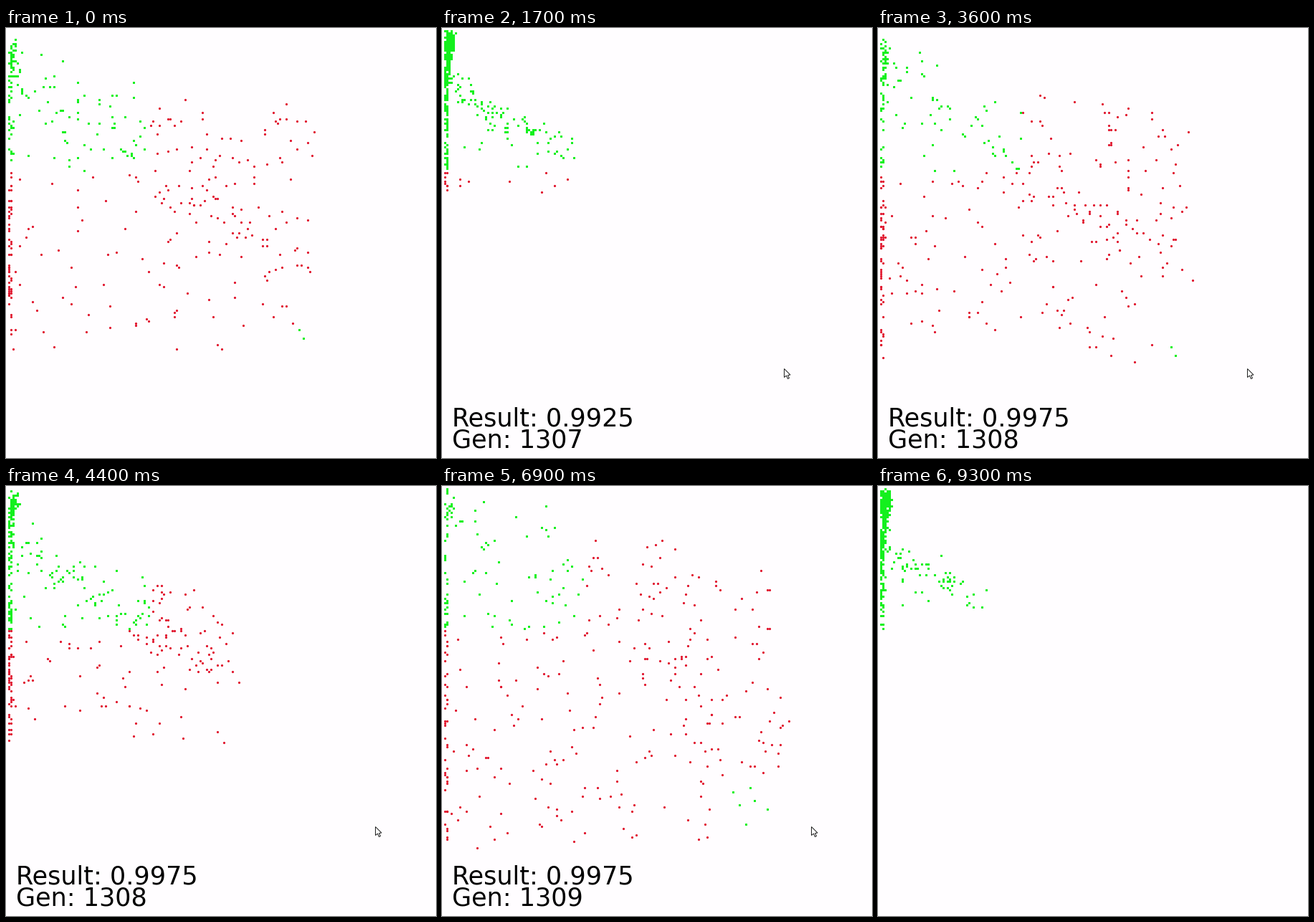
Recreate the animation shown at these times as a matplotlib script. Size 600 px wide and 600 px high, loop 9.4 s.

```python
import math

import matplotlib.pyplot as plt
import numpy as np
from matplotlib.animation import FuncAnimation
from matplotlib.patches import Polygon

SIZE, DPI = 600, 100
FRAMES, INTERVAL = 94, 100
CELL, LAST = 3, 199          # pixels per cell, highest cell index
AGENTS = 400
STEPS_PER_FRAME = 6
STARTS = (-12.3, 24.4, 61.0)  # start of each generation, in frames
RESULTS = ("0.9925", "0.9975", "0.9975")
FIRST_GEN = 1307

PAPER, GREEN, RED = "#fffdff", "#14f01e", "#e0102a"


def px(pixels):
    """Pixels to points."""
    return pixels * 72 / DPI


def pick(r, minus, plus):
    """Turn uniform draws into steps of -1, 0 or 1."""
    return np.where(r < minus, -1, np.where(r > 1 - plus, 1, 0))


def step_x(x, y, rng):
    """Rush left, then hover beside the wall in a band that widens at the top."""
    top = np.exp(-(y / 20) ** 2)
    hover = x <= 2 + 4 * top
    left = np.where(hover, 0.12, 0.87)
    right = np.where(hover, 0.03 + 0.07 * top, 0.04)
    left = np.where(x == 1, 0, left)
    right = np.where(x == 1, 0.12 + 0.6 * top, right)
    return pick(rng.random(AGENTS), left, right)


def step_y(x, y, rng):
    """Sink slowly or rise fast towards a line sloping down from the corner."""
    gap = (0.65 * x - y + 4) * CELL
    pull = 0.73 * np.tanh(gap / np.where(gap > 0, 260, 70))
    active = np.maximum(np.abs(pull), 0.3) + 0.1
    return pick(rng.random(AGENTS), (active - pull) / 2, (active + pull) / 2)


def generation(seed, start, end):
    """Yield the agents' positions for each visible frame of one generation."""
    rng = np.random.default_rng(seed)
    x, y = rng.integers(1, LAST + 1, (2, AGENTS))
    done = 0
    for frame in range(max(0, math.ceil(start)), math.ceil(end)):
        age = int((frame - start) * STEPS_PER_FRAME)
        for _ in range(age - done):
            dx, dy = step_x(x, y, rng), step_y(x, y, rng)
            x, y = np.clip(x + dx, 1, LAST), np.clip(y + dy, 1, LAST)
        done = age
        yield np.column_stack((x, y)) * CELL


history, gen_of = [], []
for g, (begin, stop) in enumerate(zip(STARTS, STARTS[1:] + (FRAMES,))):
    for cells in generation(40 + g, begin, stop):
        history.append(cells)
        gen_of.append(g)

fig = plt.figure(figsize=(SIZE / DPI, SIZE / DPI), dpi=DPI, facecolor=PAPER)
ax = fig.add_axes([0, 0, 1, 1])
ax.set_xlim(0, SIZE)
ax.set_ylim(SIZE, 0)
ax.axis("off")

safe = ax.scatter([], [], s=px(3) ** 2, marker="s", c=GREEN, linewidths=0,
                  antialiased=False)
lost = ax.scatter([], [], s=px(3.2) ** 2, marker="o", c=RED, linewidths=0)


def label(y):
    return ax.text(13.5, y, "", family="DejaVu Sans", size=px(35),
                   color="black", va="baseline", zorder=4)


result, counter = label(555), label(585)

ARROW = np.array([(0, 0), (0, 12), (3, 9.5), (5, 14), (7, 13), (5, 9), (8.5, 8.5)])
cursor = ax.add_patch(Polygon(ARROW, closed=True, facecolor="white",
                              edgecolor="#222222", linewidth=px(1), zorder=5))


def draw(frame):
    cells = history[frame]
    home = (cells < 200).all(axis=1) | (cells > 400).all(axis=1)
    safe.set_offsets(cells[home] + 0.5)
    lost.set_offsets(cells[~home] + 0.5)

    g = gen_of[frame]
    result.set_text(f"Result: {RESULTS[g]}")
    counter.set_text(f"Gen: {FIRST_GEN + g}")
    for line in (result, counter):
        line.set_visible(0 < frame < FRAMES - 1)

    x = np.interp(frame, [17, 20, 22, 71, 76], [477, 496, 515, 515, 526])
    y = np.interp(frame, [71, 76], [475, 600])
    cursor.set_xy(ARROW + (x + 0.5, y + 0.5))
    cursor.set_visible(14 <= frame < 76)
    return safe, lost, result, counter, cursor


anim = FuncAnimation(fig, draw, frames=FRAMES, interval=INTERVAL,
                     init_func=lambda: draw(0), repeat=True, repeat_delay=0)
plt.show()
```
